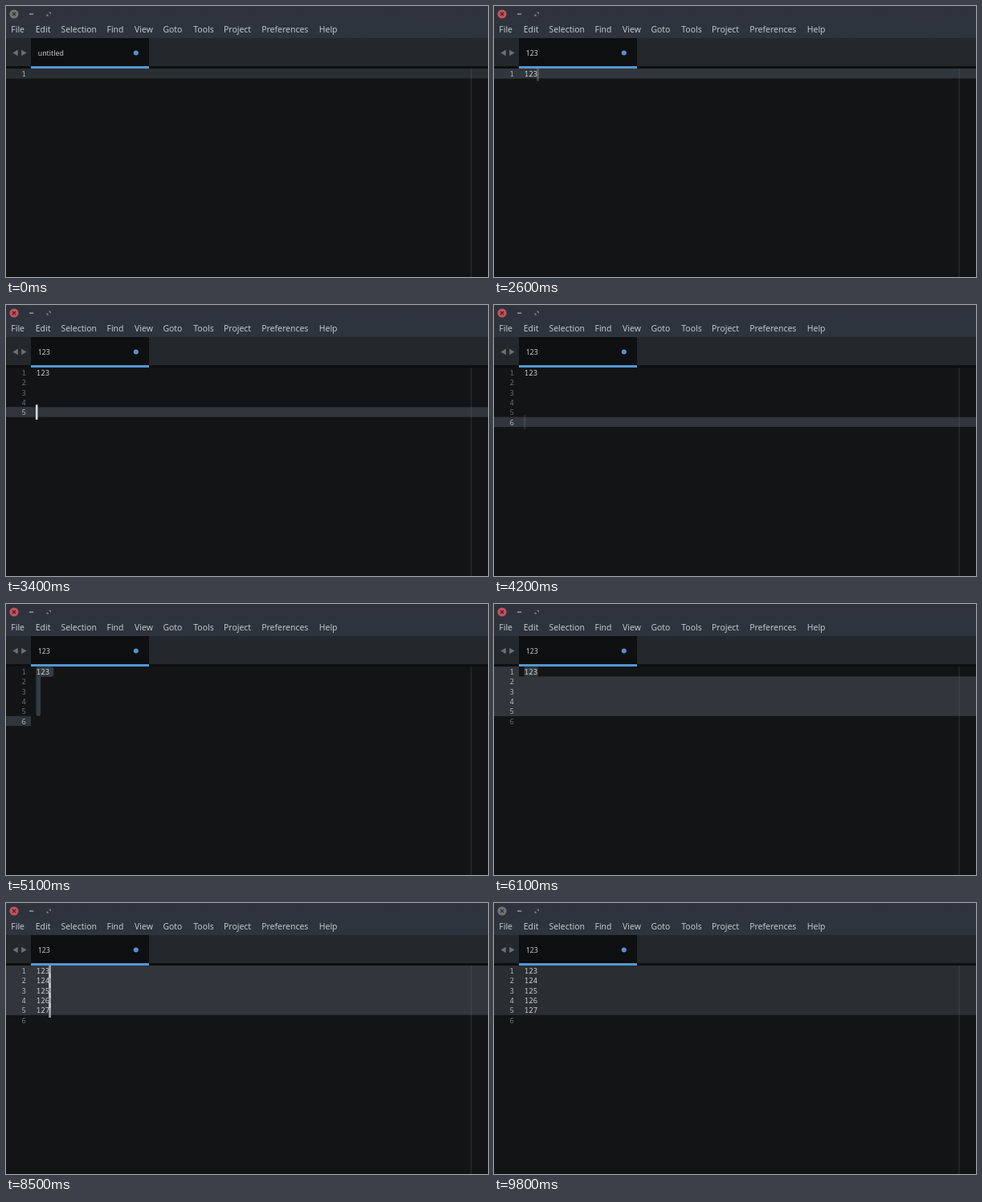
An HTML page with a canvas for the animation above (9900 ms loop, 600 by 338 pixels).

```html
<!DOCTYPE html>
<html lang="en">
<head>
<meta charset="utf-8">
<title>Editor with multiple carets</title>
<style>
  html, body { margin: 0; width: 100%; height: 100%; overflow: hidden; background: #121415; }
  canvas { display: block; width: 600px; height: 338px; }
</style>
</head>
<body>
<canvas id="stage"></canvas>
<script>
const W = 600, H = 338, LOOP = 9900, STEP = 100;
const TOP = 78, LINE = 12.35, LEFT = 37.8, CHAR = 5.46, GUTTER = 31;
const UI = '"Noto Sans", "Open Sans", sans-serif';
const MONO = '"Noto Sans Mono", "DejaVu Sans Mono", monospace';
const MENU = [['File', 6.3], ['Edit', 36.8], ['Selection', 68.5], ['Find', 125.5],
  ['View', 160], ['Goto', 195.4], ['Tools', 233.3], ['Project', 271],
  ['Preferences', 318.2], ['Help', 389.8]];

// Moments in ms
const FOCUS = 600, SELECT = 4500, SPLIT = 5500, PANEL = 6200, INSERT = 7100, BLUR = 9800;
const KEYS = [1700, 1900, 2100];
const RETURNS = [2700, 2900, 3200, 3400, 3600];
const BLINK = [[0, 'off'], [600, 'on'], [700, 'out'], [1500, 'in'], [1700, 'on'], [2400, 'out'],
  [2700, 'on'], [3900, 'out'], [4500, 'on'], [4700, 'out'], [5500, 'on'], [5700, 'out'],
  [6200, 'on'], [6500, 'out'], [7100, 'on'], [7400, 'out'], [8200, 'in'], [8700, 'out'],
  [9400, 'in'], [9800, 'off']];

const canvas = document.getElementById('stage');
const ctx = canvas.getContext('2d');
const ratio = window.devicePixelRatio || 1;
canvas.width = W * ratio;
canvas.height = H * ratio;
ctx.scale(ratio, ratio);

const rowY = n => TOP + (n - 1) * LINE;
const colX = c => LEFT + c * CHAR;
const passed = (times, t) => times.filter(x => x <= t).length;

function rect(x, y, w, h, color) {
  ctx.fillStyle = color;
  ctx.fillRect(x, y, w, h);
}

function round(x, y, w, h, r, color) {
  ctx.fillStyle = color;
  ctx.beginPath();
  ctx.roundRect(x, y, w, h, r);
  ctx.fill();
}

function disc(x, y, r, color) {
  ctx.fillStyle = color;
  ctx.beginPath();
  ctx.arc(x, y, r, 0, Math.PI * 2);
  ctx.fill();
}

function poly(points, color) {
  ctx.fillStyle = color;
  ctx.beginPath();
  points.forEach(p => ctx.lineTo(p[0], p[1]));
  ctx.fill();
}

function text(str, x, y, size, family, color) {
  ctx.font = size + 'px ' + family;
  ctx.fillStyle = color;
  ctx.fillText(str, x, y);
}

function caretAlpha(t) {
  const [start, kind] = BLINK[passed(BLINK.map(b => b[0]), t) - 1];
  const p = Math.min(1, ((t - start) / STEP + 1) / 5);
  return { off: 0, on: 1, in: p ** 1.5, out: (1 - p) ** 1.5 }[kind];
}

function caret(x, y, alpha, h = 18.6) {
  ctx.globalAlpha = alpha;
  rect(x, y, 2.6, h, '#d5dae0');
  ctx.globalAlpha = 1;
}

function drawTitleBar(focused) {
  const sky = ctx.createLinearGradient(0, 0, 0, 40);
  sky.addColorStop(0, '#2d323c');
  sky.addColorStop(1, '#2e343d');
  rect(0, 0, W, 40, sky);

  disc(10, 10, 5.6, focused ? '#c7505a' : '#727373');
  ctx.strokeStyle = focused ? '#3a2830' : '#2f333b';
  ctx.lineWidth = 1.3;
  ctx.beginPath();
  ctx.moveTo(8, 8); ctx.lineTo(12, 12);
  ctx.moveTo(12, 8); ctx.lineTo(8, 12);
  ctx.stroke();

  rect(29, 9.4, 5.2, 1.4, '#989ca4');
  poly([[53, 7.8], [55.8, 7.8], [55.8, 10.6]], '#8b9098');
  poly([[50.6, 9.8], [50.6, 12.6], [53.4, 12.6]], '#8b9098');

  for (const [label, x] of MENU) text(label, x, 33.2, 10.45, UI, '#c2c6cc');
}

function drawTabs(title) {
  rect(0, 40, W, 35, '#23282c');
  rect(0, 75, W, 3, '#0d0f10');
  rect(GUTTER, 40, 147, 35, '#0e0f10');
  rect(GUTTER, 75, 147, 3, '#5596d2');
  poly([[8.3, 58.5], [14.8, 54.7], [14.8, 62.3]], '#697077');
  poly([[25.7, 58.5], [19.2, 54.7], [19.2, 62.3]], '#697077');
  text(title, 39.7, 61.8, 8.8, UI, '#c6c9cb');
  disc(161.8, 58.4, 3, '#5294d2');
}

// Which rows are lit, where the carets stand and what is written
function editorState(t) {
  const typed = '123'.slice(0, passed(KEYS, t));
  const row = 1 + passed(RETURNS, t);
  const five = [1, 2, 3, 4, 5];
  if (t >= INSERT) {
    return { lines: five.map(n => String(122 + n)), count: 6, lit: five, full: five,
      carets: five.map(n => [3, n]) };
  }
  const s = { lines: [typed], count: row, lit: [row], full: [row], carets: [[row > 1 ? 0 : typed.length, row]] };
  if (t >= SPLIT) {
    s.lit = five;
    s.full = five.slice(1);
    s.carets = five.map(n => [n === 1 ? 3 : 0, n]);
  } else if (t >= SELECT) {
    s.full = [];
  }
  return s;
}

function drawSelection(t) {
  const color = '#343b41';
  if (t >= SPLIT && t < INSERT) {
    round(37.5, TOP + 0.4, 17.4, LINE - 0.4, 1.5, color);
  } else if (t >= SELECT && t < SPLIT) {
    round(37.5, TOP + 0.4, 21.7, LINE, [2, 2, 2, 0], color);
    round(37.5, rowY(2), 5.7, LINE * 4, [0, 0, 2, 2], color);
  }
}

function drawPanel(alpha) {
  rect(308, TOP, W - 308, 294 - TOP, '#23282c');
  rect(313, 83, W - 313, 26, '#15181a');
  caret(315.7, 86, alpha, 20);
}

function drawEditor(t, focused) {
  const s = editorState(t);
  const alpha = caretAlpha(t);
  const glow = focused ? '#30363b' : '#292e33';
  const panel = t >= PANEL && t < INSERT;

  ctx.save();
  ctx.beginPath();
  ctx.rect(0, TOP, W, H - TOP);
  ctx.clip();
  rect(0, TOP, W, H - TOP, '#121415');

  const runs = (rows, w) => {
    if (rows.length) rect(0, rowY(rows[0]), w, rows.length * LINE, glow);
  };
  runs(s.lit, GUTTER);
  runs(s.full, W);
  rect(578.5, TOP, 1, H - TOP, 'rgba(120,128,134,0.28)');
  drawSelection(t);

  for (let n = 1; n <= s.count; n++) {
    const y = rowY(n) + 9.9;
    text(String(n), 19.6, y, 9.1, MONO, s.lit.includes(n) ? '#b4b8ba' : '#6a6e70');
    if (s.lines[n - 1]) text(s.lines[n - 1], LEFT, y, 9.1, MONO, '#d0d4d6');
  }
  if (!panel) for (const [c, n] of s.carets) caret(colX(c) - 0.9, rowY(n) - 3, alpha);
  if (panel) drawPanel(alpha);
  ctx.restore();
}

function draw(time) {
  const t = Math.floor(time % LOOP / STEP) * STEP;
  const focused = t >= FOCUS && t < BLUR;
  drawTitleBar(focused);
  drawTabs('123'.slice(0, passed(KEYS, t)) || 'untitled');
  drawEditor(t, focused);
}

let begin = null;
function tick(now) {
  if (begin === null) begin = now;
  draw(now - begin);
  requestAnimationFrame(tick);
}
draw(0);
requestAnimationFrame(tick);
</script>
</body>
</html>
```
